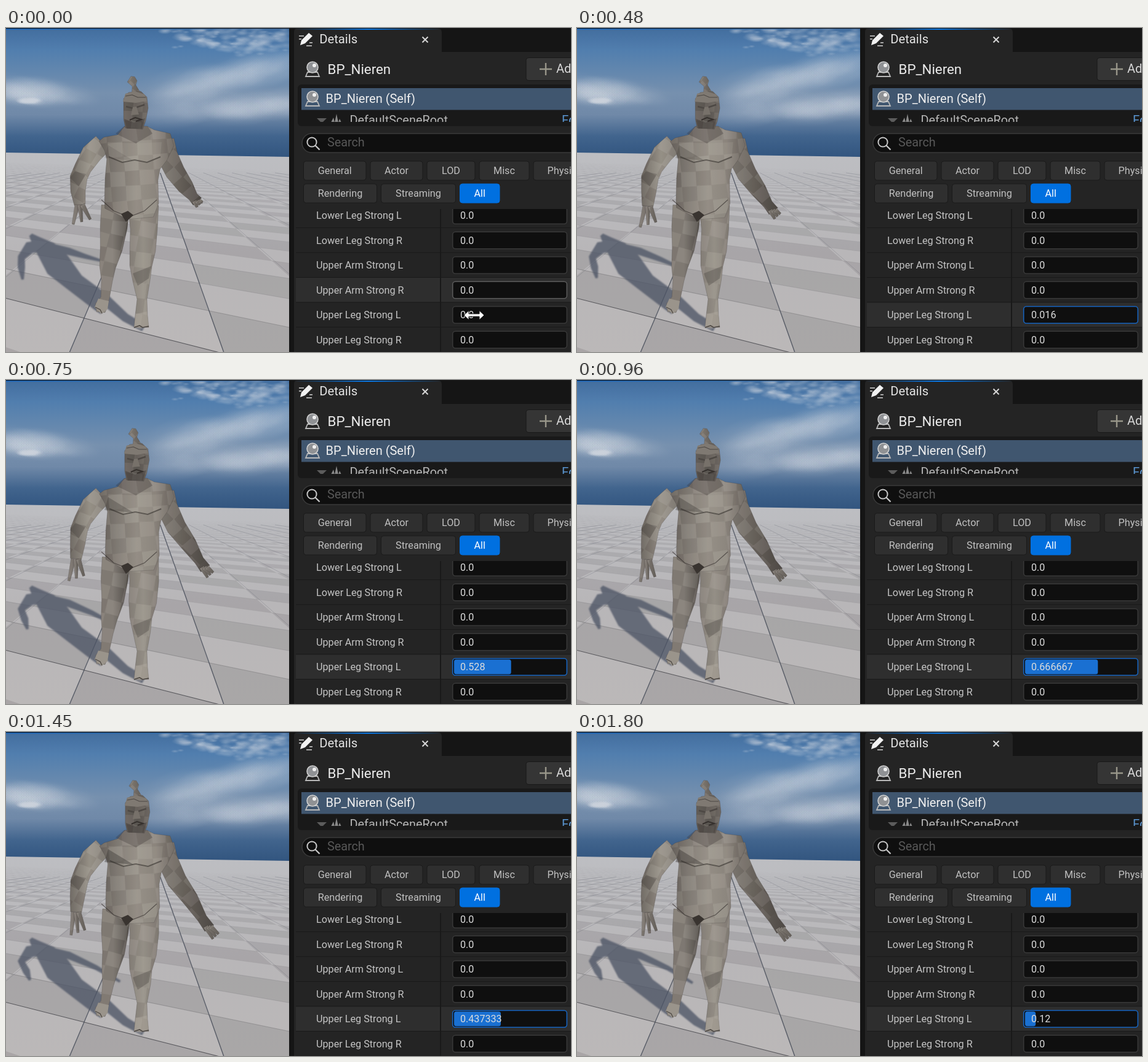
An HTML page with a canvas for the animation above (1.87 s loop, 918 px wide and 528 px high).

```html
<!DOCTYPE html>
<html lang="en">
<head>
<meta charset="utf-8">
<title>Details panel</title>
<style>
html, body { margin: 0; width: 100%; height: 100%; overflow: hidden; background: #151515; }
canvas, svg { position: absolute; left: 0; top: 0; display: block; }
text { font-family: Roboto, sans-serif; white-space: pre; }
</style>
</head>
<body>
<canvas id="scene" width="460" height="528"></canvas>
<svg id="ui" width="918" height="528" viewBox="0 0 918 528"></svg>
<script>
const LOOP = 1870, W = 460, H = 528, PRESS = 330, STEP = 70;
const swingKeys = [[0, 0], [330, .17], [470, .39], [750, .61], [1170, .86], [1800, 1]];
const valueKeys = [[400, .006], [470, .016], [750, .528], [1170, .8053], [1240, .816], [1450, .437], [1800, .12]];

const mix = (a, b, k) => a + (b - a) * k;
const hash = (i, j) => { const s = Math.sin(i * 127.1 + j * 311.7) * 43758.5; return s - Math.floor(s); };

function along(keys, t) {
  const i = keys.findIndex(key => key[0] >= t);
  if (i < 1) return keys[0][1];
  const [t0, a] = keys[i - 1], [t1, b] = keys[i];
  return mix(a, b, (t - t0) / (t1 - t0));
}
function heldTime(t) {
  if (t < PRESS) return t < 130 ? 0 : 130;
  return PRESS + STEP * Math.floor((t - PRESS) / STEP);
}
// the slider moves in units of 1/375
const sliderValue = t => t <= PRESS ? 0 : Math.round(along(valueKeys, t) * 375) / 375;

function trace(c, pts) {
  c.beginPath();
  pts.forEach(([x, y]) => c.lineTo(x, y));
}
function poly(c, pts, fill) { trace(c, pts); c.closePath(); c.fillStyle = fill; c.fill(); }
function line(c, pts, color, width) { trace(c, pts); c.strokeStyle = color; c.lineWidth = width; c.stroke(); }
function ramp(c, x0, y0, x1, y1, colors) {
  const g = c.createLinearGradient(x0, y0, x1, y1);
  colors.forEach((color, i) => g.addColorStop(i / (colors.length - 1), color));
  return g;
}

// ---- sky and floor, drawn once
const back = document.createElement('canvas');
back.width = W; back.height = H;

function cloud(c, x, y, w, h, tilt, puff, alpha) {
  c.save(); c.translate(x, y); c.rotate(tilt);
  for (let i = 0; i < 70; i++) {
    const r = puff * (.5 + hash(i, x));
    c.save();
    c.translate((hash(i, y) + hash(i, w) - 1) * w, (hash(i, x + 3) + hash(i, y + 5) - 1) * h);
    c.scale(2, .8);
    const g = c.createRadialGradient(0, 0, 0, 0, 0, r);
    g.addColorStop(0, `rgba(205,212,222,${alpha})`);
    g.addColorStop(1, 'rgba(205,212,222,0)');
    c.fillStyle = g; c.fillRect(-r, -r, 2 * r, 2 * r);
    c.restore();
  }
  c.restore();
}

const horizon = x => 203 + .015 * x;
function floorPoint(u, v) {
  const d = 1230 / (v - u), x = 240 + u * d;
  return [x, horizon(x) + d];
}

function drawBack(c) {
  c.fillStyle = ramp(c, 0, 0, 0, 212, ['#426d9e', '#517eae', '#6387ae', '#7690ae', '#7089a8', '#41648d', '#31547e']);
  c.fillRect(0, 0, W, 212);
  cloud(c, 320, 14, 75, 26, 0, 5, .3);
  cloud(c, 410, 20, 60, 26, 0, 6, .26);
  cloud(c, 370, 80, 130, 22, -.25, 24, .085);
  cloud(c, 380, 130, 140, 14, -.06, 24, .07);
  cloud(c, 45, 104, 80, 18, .08, 20, .07);
  cloud(c, 38, 119, 16, 4, 0, 5, .18);

  const ground = [[0, horizon(0)], [W, horizon(W)], [W, H], [0, H]];
  poly(c, ground, ramp(c, 0, 203, 0, H, ['#bdbec2', '#b8b6b8', '#bbb8b8']));
  c.save(); trace(c, ground); c.clip();
  const du = .777, dv = 1.05, u0 = -.424, v0 = 4.17;
  for (let j = -2; j < 60; j++) for (let i = -26; i < 27; i++) {
    const u = u0 + i * du, v = v0 + j * dv;
    if (v - u - du < .8 || (i + j) % 2 === 0) continue;
    poly(c, [floorPoint(u, v), floorPoint(u + du, v), floorPoint(u + du, v + dv), floorPoint(u, v + dv)],
      `rgba(70,68,72,${.15 * (1 - j / 60)})`);
  }
  for (let i = -8; i < 10; i++) {
    const u = u0 + i * du, main = i === 0 || i === 1;
    line(c, [[240 + u * 30, 236], [240 + u * 330, 536]], `rgba(62,68,82,${main ? .75 : .25})`, main ? 1.4 : .8);
  }
  for (let j = 0; j < 9; j++) {
    const v = v0 + j * dv;
    line(c, [[0, 203 + 990 / v], [W, 210 + 1450 / v]], `rgba(60,60,66,${.75 / (1 + 2 * j)})`, 1.1);
  }
  c.restore();
}
drawBack(back.getContext('2d'));

// ---- figure: chains of joints [x, y, radius]
function outline(chain) {
  const left = [], right = [];
  chain.forEach(([x, y, r], i) => {
    const a = chain[Math.max(0, i - 1)], b = chain[Math.min(chain.length - 1, i + 1)];
    const angle = Math.atan2(b[1] - a[1], b[0] - a[0]) + Math.PI / 2;
    const dx = r * Math.cos(angle), dy = r * Math.sin(angle);
    left.push([x + dx, y + dy]);
    right.unshift([x - dx, y - dy]);
  });
  return left.concat(right);
}

// faceted limb with a checker that follows its first joint
function limb(c, chain, colors, cell, tilt) {
  const pts = outline(chain), xs = pts.map(q => q[0]);
  poly(c, pts, ramp(c, Math.min(...xs), 0, Math.max(...xs), 0, colors));
  c.save(); c.clip();
  c.translate(chain[0][0], chain[0][1]); c.rotate(tilt);
  for (let i = -5; i < 6; i++) for (let j = -2; j < 10; j++) {
    const x = i * cell, y = j * cell, s = 4 * hash(i, j + cell) - 2, a = .03 + .06 * hash(i + cell, j);
    poly(c, [[x, y + s], [x + cell, y - s], [x + cell + s, y + cell], [x + s, y + cell]],
      (i + j) & 1 ? `rgba(190,185,177,${a + .05})` : `rgba(48,44,42,${a})`);
  }
  c.restore();
  trace(c, pts); c.closePath();
  c.strokeStyle = 'rgba(50,46,44,.3)'; c.lineWidth = .7; c.stroke();
}

const LIT = '#9a948b', MID = '#847e77', DIM = '#68625c', DARK = '#4d4844';

function fingers(c, from, to, spread, n) {
  for (let i = 0; i < n; i++) {
    const k = n > 1 ? i / (n - 1) - .5 : 0;
    limb(c, [[from[0] + k * 8, from[1], 4], [to[0] + k * spread, to[1] - 4 * i, 2]], [MID, DIM], 30, 0);
  }
}

function drawShadow(c, p) {
  const hips = [112, 415, 16];
  const chains = [
    [[40, 337, 3], [48, 346, 8], [66, 362, 17], [84, 386, 22], hips, [150, 453, 9], [158, 462, 6]],
    [hips, [160, 442, 9], [194, 472, 7], [224, 489, 6]],
    [[60, 354, 9], [38, 358, 10], [25, 374, 6], [mix(25, 34, p), 390, 6], [mix(27, 40, p), mix(410, 404, p), 2]],
    [[70, 356, 6], [102, 364, 6], [mix(128, 148, p), mix(372, 385, p), 4], [mix(154, 188, p), mix(379, 409, p), 2]]
  ];
  c.save(); c.filter = 'blur(.8px)';
  c.beginPath();
  for (const chain of chains) outline(chain).forEach(([x, y], i) => i ? c.lineTo(x, y) : c.moveTo(x, y));
  c.fillStyle = 'rgba(76,83,100,.76)'; c.fill();
  c.restore();
}

function drawHead(c, dx) {
  c.save(); c.translate(dx, 0);
  limb(c, [[206, 79, 3], [205, 87, 8], [208, 94, 3], [211, 106, 7]], [MID, DIM], 9, .5);
  limb(c, [[209, 104, 10], [210, 114, 19], [211, 130, 20], [209, 150, 18], [208, 164, 14]],
    [DIM, '#5d5853', '#706a64'], 16, .1);
  poly(c, [[190, 120], [194, 107], [209, 103], [225, 108], [229, 119], [211, 122]], '#7f7972');
  line(c, [[194, 111], [205, 109], [214, 113], [227, 113]], DARK, 1.2);
  line(c, [[195, 128], [207, 131], [225, 125]], DARK, 2.6);
  poly(c, [[206, 129], [212, 128], [216, 141], [203, 142]], '#77716a');
  line(c, [[201, 150], [210, 146], [220, 149], [211, 152]], '#35302d', 2);
  poly(c, [[192, 148], [208, 154], [226, 147], [221, 164], [196, 164]], 'rgba(56,51,48,.4)');
  c.restore();
}

function drawScene(c, p, value) {
  const to = (x0, y0, x1, y1, r) => [mix(x0, x1, p), mix(y0, y1, p), r];
  const bend = -6 * Math.sin(Math.PI * p), s = 2 * p, bulge = 3 * value;
  c.drawImage(back, 0, 0);
  drawShadow(c, p);

  limb(c, [[178 + s, 290, 23], [175 + s, 325, 22], [171 + 2 * s, 360, 18], [165 + 2 * s, 390, 13],
    [164 + s, 412, 9], [161, 440, 7], [155, 452, 10], [154, 463, 7]], [MID, MID, DARK], 23, .2);
  poly(c, [[144, 455], [150, 441], [167, 445], [165, 458], [155, 466]], LIT);
  line(c, [[145, 455], [153, 459], [156, 465]], DARK, 1.3);

  limb(c, [[223, 290, 25], [224 + s / 2, 328, 22 + bulge], [222, 362, 21 + bulge], [219, 388, 18],
    [220 + s / 2, 412, 14], [221, 442, 8], [220, 468, 10], [220, 488, 12]], [MID, LIT, MID], 25, .15);
  poly(c, [[206, 400], [236, 388], [232, 408], [214, 420]], 'rgba(54,49,46,.28)');
  poly(c, [[211, 466], [229, 462], [232, 485], [218, 491], [208, 487]], 'rgba(180,173,162,.4)');
  line(c, [[208, 488], [217, 485], [222, 488], [232, 486]], DARK, 1.6);

  const wrist = to(304, 275, 320, 306, 8);
  limb(c, [[258, 182, 15], [262, 208, 17], to(275, 235, 278, 243, 16), to(292, 259, 300, 273, 13), wrist,
    to(311, 283, 332, 323, 9)], [MID, DIM, DARK], 21, .8);
  fingers(c, to(310, 282, 330, 320), to(315, 292, 343, 341), 9, 3);

  const hand = to(120, 288, 114, 294, 9);
  hand[0] += bend / 2;
  limb(c, [[157, 188, 16], [139, 205, 17], [125, 228, 14], to(118, 244, 119, 244, 14),
    to(117, 266, 116, 268, 12), hand], [DIM, LIT, MID], 20, .5);
  fingers(c, hand, [mix(123, 118, p) + bend, mix(320, 332, p)], mix(28, 22, p), 3);
  poly(c, [[104, 244], [112, 234], [130, 238], [118, 258]], 'rgba(52,47,44,.22)');

  limb(c, [[211, 160, 18], [211, 170, 30], [213, 175, 54], [212 + s / 2, 188, 61], [211 + s / 2, 208, 51],
    [207 + s, 222, 44], [204 + s, 246, 43], [204 + s, 283, 44], [200 + s, 301, 40], [199, 311, 4]],
    [DIM, MID, LIT, '#908a82', DIM], 24, -.08);
  for (const side of [-1, 1]) {
    const x = 209 + s;
    poly(c, [[x, 188], [x + side * 44, 186], [x + side * 42, 208], [x + side * 20, 219], [x, 215]], 'rgba(182,177,168,.17)');
    line(c, [[x, 215], [x + side * 20, 219], [x + side * 42, 210]], 'rgba(48,44,41,.55)', 2);
    line(c, [[200, 308], [200 + side * 25, 298], [200 + side * 45, 280]], 'rgba(42,38,36,.6)', 1.1);
  }
  poly(c, [[160, 212], [166, 191], [207, 216]], `rgba(50,46,43,${.12 + .28 * p})`);
  poly(c, [[192, 160], [230, 160], [238, 172], [211, 188], [178, 172]], 'rgba(54,49,46,.3)');
  poly(c, [[187, 303], [198, 298], [207, 305], [195, 316]], '#393430');
  drawHead(c, 3 * p);

  c.fillStyle = '#0c0f14'; c.fillRect(0, 0, W, 1);
  c.fillStyle = ramp(c, 0, 0, W, 0, ['#1263bd', '#2b68a8', 'rgba(60,100,150,.3)']);
  c.fillRect(0, 1, W, 1.5);
}

// ---- details panel
const box = (x, y, w, h, r, fill, extra = '') =>
  `<rect x="${x}" y="${y}" width="${w}" height="${h}" rx="${r}" fill="${fill}" ${extra}/>`;
const label = (x, y, size, str, fill = '#c4c4c4', extra = '') =>
  `<text x="${x}" y="${y}" font-size="${size}" fill="${fill}" ${extra}>${str}</text>`;
const shape = (d, fill, extra = '') => `<path d="${d}" fill="${fill}" ${extra}/>`;
const stroke = (d, color, width) => shape(d, 'none', `stroke="${color}" stroke-width="${width}"`);

// a row of buttons, each [caption, width], with even gaps
function buttons(y, items) {
  let x = 483.5;
  return items.map(([str, w]) => {
    const on = str === 'All';
    const svg = box(x, y, w, 31, 4, on ? '#0070e0' : '#2f2f2f', `stroke="${on ? '#0070e0' : '#1a1a1a'}"`) +
      label(x + w / 2, y + 21, 16.2, str, on ? '#fff' : '#c0c0c0', 'text-anchor="middle"');
    x += w + 7;
    return svg;
  }).join('');
}
const actor = y =>
  stroke(`M487 ${y + 12}L490 ${y + 5}H506L509 ${y + 12}Z`, '#b9b9b9', 1.8) +
  `<circle cx="498" cy="${y - 3}" r="9" fill="#8f9194" stroke="#d0d0d0" stroke-width="1.6"/>` +
  `<circle cx="501" cy="${y - 6}" r="3" fill="#f0f0f0"/>`;

const rows = ['Lower Leg', 'Upper Arm', 'Upper Leg'].flatMap(part => ['L', 'R'].map(side => `${part} Strong ${side}`));
const rowSvg = rows.map((name, i) => {
  const y = 305.5 + 40.5 * i;
  return box(471, y - 20, 447, 40.5, 0, '#242424', `id="row${i}"`) +
    box(471, y + 19.5, 447, 1.8, 0, '#191919') +
    label(504, y + 5.5, 16.2, name) +
    box(725.7, y - 13.7, 185.6, 27.4, 4.5, '#0f0f0f', `id="field${i}" stroke="#383838" stroke-width="1.6"`) +
    (i === 4 ? box(728, y - 12, 0, 24, 3.5, '#1a70d2', 'id="bar"') : '') +
    label(738, y + 5.5, 16.1, '0.0', '#dcdcdc', `id="num${i}"`);
}).join('');

document.getElementById('ui').innerHTML =
  `<defs><clipPath id="list"><rect x="468" y="295" width="450" height="233"/></clipPath>
  <clipPath id="tree"><rect x="474" y="133" width="444" height="20"/></clipPath>
  <linearGradient id="glow"><stop offset="0" stop-color="#0070e0" stop-opacity="0"/><stop offset=".5" stop-color="#0a78e6"/>
  <stop offset="1" stop-color="#0070e0" stop-opacity="0"/></linearGradient>
  <linearGradient id="tipFill" x2="0" y2="1"><stop stop-color="#d2d2d2"/><stop offset="1" stop-color="#bcbcbc"/></linearGradient></defs>` +
  box(460, 0, 458, 528, 0, '#151515') +
  box(468, 39, 450, 489, 0, '#242424') +
  shape('M468 39V6Q468 1 473 1H702Q708 1 708 7V39Z', '#242424') +
  box(468, 1, 240, 2, 0, 'url(#glow)') +
  shape('M478 28L480 20L492 8L498 13L486 25Z', '#f2f2f2') +
  stroke('M476 13H484M476 18H480M488 29H497M493 24H498', '#d5d5d5', 1.7) +
  label(509.3, 25, 20.2, 'Details', '#e4e4e4') +
  stroke('M676.5 14.5L685.5 23.5M685.5 14.5L676.5 23.5', '#d6d6d6', 2) +
  actor(67) + label(522.5, 75, 22.3, 'BP_Nieren', '#ededed') +
  box(845, 48.5, 90, 37, 4, '#353535', 'stroke="#191919"') +
  stroke('M867 67H887M877 57V77', '#99978a', 2.4) +
  label(894, 73, 20, 'Add', '#d8d8d8') +
  box(474, 92, 460, 68, 6, '#191919') +
  box(480, 98, 440, 35.5, 0, '#40566f') +
  actor(115) + label(519.6, 122, 20, 'BP_Nieren (Self)', '#f0f0f0') +
  `<g clip-path="url(#tree)">${shape('M505 147H521L513 155Z', '#5c5c5c')}
  ${shape('M527 156L532 146L534 154L537 140L540 154L542 148L546 156Z', '#8a8a8a')}
  ${label(558.5, 157, 19.9, 'DefaultSceneRoot', '#b5b5b5')}${label(903, 157, 19.9, 'Edit', '#5a95d0')}</g>` +
  box(481, 172, 460, 31, 15.5, '#0f0f0f', 'stroke="#3a3a3a" stroke-width="1.5"') +
  '<circle cx="497" cy="186" r="7.6" fill="none" stroke="#c6c6c6" stroke-width="2"/>' +
  stroke('M502.5 191.5L509.5 198.5', '#c6c6c6', 2.3) +
  label(522, 193, 19.8, 'Search', '#585858') +
  buttons(217, [['General', 101.5], ['Actor', 85], ['LOD', 78], ['Misc', 81], ['Physics', 101]]) +
  buttons(254, [['Rendering', 119], ['Streaming', 121], ['All', 64.5]]) +
  `<g clip-path="url(#list)">${rowSvg}${box(705, 295, 2, 233, 0, '#191919')}</g>` +
  '<circle id="click" cx="761" cy="468" r="18" fill="#c0b51b" fill-opacity=".86"/>' +
  shape('M744 468L752 460.5V465.8H769V460.5L777 468L769 475.5V470.2H752V475.5Z', '#fff', 'id="cursor" stroke="#111"') +
  `<g id="tip">${box(776, 478.5, 103, 60, 0, 'url(#tipFill)', 'stroke="#8e8e8e" stroke-width="2"')}${label(790, 510.5, 18, '0.000000', '#161616')}</g>`;

const el = id => document.getElementById(id);
const show = (id, on) => el(id).setAttribute('visibility', on ? 'visible' : 'hidden');

function drawPanel(t, value) {
  const drag = t > PRESS, hover = t ? 4 : 3;
  rows.forEach((_, i) => {
    el('row' + i).setAttribute('fill', i === hover ? '#2e2e2e' : '#242424');
    el('field' + i).setAttribute('stroke', i !== hover ? '#383838' : drag ? '#1763bd' : '#5a5a5a');
  });
  el('bar').setAttribute('width', Math.max(0, 185 * value - 5));
  el('num4').textContent = value ? String(+value.toFixed(6)) : '0.0';
  show('cursor', !drag);
  show('click', t === PRESS);
  show('tip', t === PRESS);
}

const ctx = el('scene').getContext('2d');
const start = performance.now();
let last = -1;
function tick() {
  const t = heldTime((performance.now() - start) % LOOP);
  if (t !== last) {
    last = t;
    const value = sliderValue(t);
    drawScene(ctx, along(swingKeys, t), value);
    drawPanel(t, value);
  }
  requestAnimationFrame(tick);
}
tick();
</script>
</body>
</html>
```
